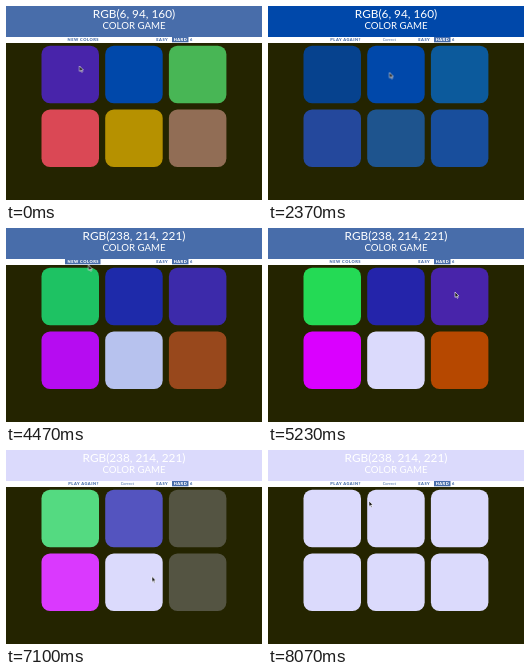
Write an HTML page that moves like this. It is 256 px wide and 194 px high and loops after 8.11 s.

```html
<!DOCTYPE html>
<html lang="en">
<head>
<meta charset="utf-8">
<title>Color game</title>
<style>
  :root { --bg: #242400; --steel: #486daa; --blue: #0048aa; --lilac: #dbdafc; }
  html, body { margin: 0; width: 100%; height: 100%; overflow: hidden; background: var(--bg); }
  svg { display: block; width: 100vw; height: 100vh; font-family: Lato, "Open Sans", sans-serif; }
  text { text-anchor: middle; }
  svg * { animation-duration: 8110ms; animation-iteration-count: infinite; }

  .head { animation-name: head; animation-timing-function: step-end; }
  .title { fill: #fff; font-size: 11.8px; }
  .name { fill: #fff; font-size: 9.7px; }
  .bar { fill: var(--steel); font-size: 4px; font-weight: 900; letter-spacing: .5px; }
  .on { fill: #fff; }
  .note { font-weight: 400; letter-spacing: 0; }
  .swap { animation-timing-function: step-end; }
  .first { animation-name: first; }
  .second { animation-name: second; }
  .fresh { animation-name: fresh; }
  .again { animation-name: again; }
  .miss { animation-name: miss; }
  .hover { animation-name: hover; }
  .label { animation-name: label; animation-timing-function: step-end; }

  /* --a, --m: first round before and after the miss; --b, --n, --o: second round and its two misses */
  .tile { animation-name: tile; animation-timing-function: ease; }
  .t1 { --a: #4824aa; --m: var(--bg); --b: #24da55; --n: var(--b); --o: var(--b); }
  .t2 { --a: var(--blue); --m: var(--a); --b: #2424aa; --n: var(--b); --o: var(--b); }
  .t3 { --a: #48b655; --m: var(--a); --b: #4824aa; --n: var(--bg); --o: var(--bg); }
  .t4 { --a: #da4855; --m: var(--a); --b: #da00ff; --n: var(--b); --o: var(--b); }
  .t5 { --a: #b69100; --m: var(--a); --b: var(--lilac); --n: var(--b); --o: var(--b); }
  .t6 { --a: #916d55; --m: var(--a); --b: #b64800; --n: var(--b); --o: var(--bg); }
  .cursor { animation-name: cursor; animation-timing-function: ease-in-out; }

  @keyframes tile {
    0%, 2.47% { fill: var(--a); }
    9.86%, 25.28% { fill: var(--m); }
    32.68%, 51.17% { fill: var(--blue); }
    58.57%, 64.73% { fill: var(--b); }
    72.13%, 74.97% { fill: var(--n); }
    82.37%, 86.19% { fill: var(--o); }
    93.59%, 100% { fill: var(--lilac); }
  }
  @keyframes head {
    0%, 51.17% { fill: var(--steel); }
    25.28% { fill: var(--blue); }
    86.19%, 100% { fill: var(--lilac); }
  }
  @keyframes first { 0% { opacity: 1; } 51.17%, 100% { opacity: 0; } }
  @keyframes second { 0% { opacity: 0; } 51.17%, 100% { opacity: 1; } }
  @keyframes fresh { 0%, 51.17% { opacity: 1; } 25.28%, 86.19%, 100% { opacity: 0; } }
  @keyframes again { 0%, 51.17% { opacity: 0; } 25.28%, 86.19%, 100% { opacity: 1; } }
  @keyframes miss { 0%, 25.28%, 86.19%, 100% { opacity: 0; } 2.47%, 64.73% { opacity: 1; } }
  @keyframes hover { 0%, 56.5%, 100% { opacity: 0; } 49% { opacity: 1; } }
  @keyframes label { 0%, 56.5%, 100% { fill: var(--steel); } 49% { fill: #fff; } }
  @keyframes cursor {
    0%, 3.7% { transform: translate(73.5px, 60px); }
    14.8%, 40.7% { transform: translate(121.5px, 66.5px); }
    49.9%, 55.7% { transform: translate(82.5px, 37px); }
    63.5%, 66% { transform: translate(187px, 64px); }
    73%, 76% { transform: translate(187px, 129px); }
    84.5%, 89% { transform: translate(146px, 126.5px); }
    99.5%, 100% { transform: translate(101px, 51px); }
  }
</style>
</head>
<body>
<svg viewBox="0 0 256 194" preserveAspectRatio="none">
  <rect width="256" height="194" fill="#242400"/>
  <rect class="head" width="256" height="31"/>
  <text class="title swap first" x="128" y="12.2">RGB(6, 94, 160)</text>
  <text class="title swap second" x="128" y="12.2">RGB(238, 214, 221)</text>
  <text class="name" x="128" y="22.6">COLOR GAME</text>

  <rect y="31" width="256" height="6" fill="#fff"/>
  <g class="bar">
    <rect class="swap hover" x="59" y="31" width="35.5" height="5.3"/>
    <g class="label">
      <text class="swap fresh" x="77.3" y="35">NEW COLORS</text>
      <text class="swap again" x="77.6" y="35">PLAY AGAIN?</text>
    </g>
    <text class="note swap miss" x="121.5" y="35">Try again</text>
    <text class="note swap again" x="121.3" y="35">Correct</text>
    <text x="156.3" y="35">EASY</text>
    <rect x="166" y="31" width="16.5" height="5.3"/>
    <text class="on" x="174.5" y="35">HARD</text>
    <text x="185.4" y="35">6</text>
  </g>

  <g id="tiles"></g>
  <path class="cursor" d="M0 0V5.4L1.3 4.3 2.2 6.3 3.1 5.9 2.2 4H3.9Z" fill="#111" stroke="#fff" stroke-width=".6"/>
</svg>
<script>
  const tiles = document.getElementById('tiles');
  for (let i = 0; i < 6; i++) {
    const tile = document.createElementNS('http://www.w3.org/2000/svg', 'rect');
    const box = { class: `tile t${i + 1}`, x: 35.5 + i % 3 * 63.7, y: 39.8 + (i > 2) * 63.6, width: 57.5, height: 57.5, rx: 8.6 };
    for (const key in box) tile.setAttribute(key, box[key]);
    tiles.append(tile);
  }
</script>
</body>
</html>
```
